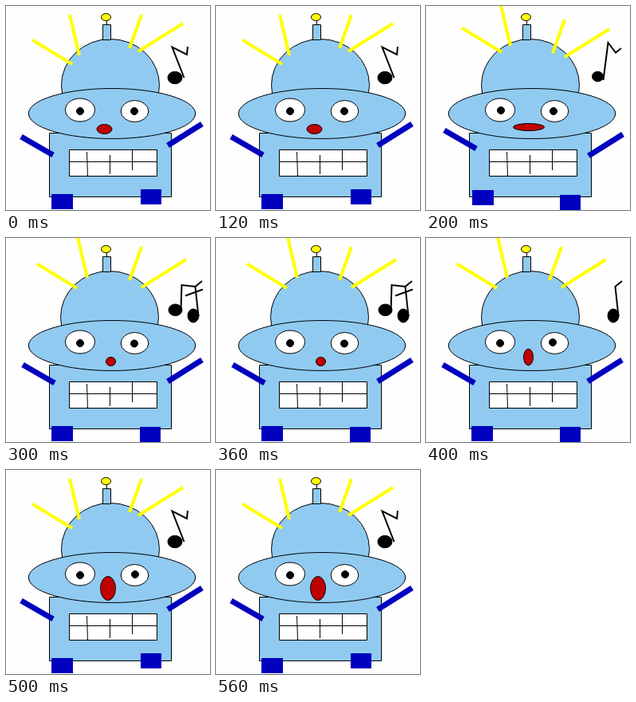
Recreate the animation shown at these times as an HTML page with a canvas. Size 256 by 256 pixels, loop 0.6 s.

```html
<!DOCTYPE html>
<html lang="en">
<head>
<meta charset="utf-8">
<title>Singing robot</title>
<style>
  html, body { margin: 0; width: 100%; height: 100%; overflow: hidden; background: #fefefe; }
  canvas { display: block; width: 256px; height: 256px; }
</style>
</head>
<body>
<canvas id="stage" width="256" height="256"></canvas>
<script>
const ctx = document.getElementById('stage').getContext('2d');
const SKIN = '#90caf1', YELLOW = '#ffff00', BLUE = '#0000bf', RED = '#c00000';

function paint(fill) {
  ctx.fillStyle = fill;
  ctx.fill();
  ctx.strokeStyle = '#000';
  ctx.lineWidth = 1;
  ctx.stroke();
}
function oval(x, y, rx, ry, fill) {
  ctx.beginPath();
  ctx.ellipse(x, y, rx, ry, 0, 0, Math.PI * 2);
  paint(fill);
}
function box(x, y, w, h, fill) {
  ctx.beginPath();
  ctx.rect(x, y, w, h);
  paint(fill);
}
function line(color, width, ...points) {
  ctx.beginPath();
  for (let i = 0; i < points.length; i += 2) ctx.lineTo(points[i], points[i + 1]);
  ctx.strokeStyle = color;
  ctx.lineWidth = width;
  ctx.stroke();
}
function slide([dx, dy], x1, y1, x2, y2, color, width) {
  line(color, width, x1 + dx, y1 + dy, x2 + dx, y2 + dy);
}

// Offsets of the moving parts from their resting places
const still = [0, 0];
const rest = { rays: [still, still, still, still], arms: [still, still], feet: [still, still] };
const high = {
  rays: [[12, -15], [14, -12], [4, 6], [8, 7]],
  arms: [[4, -8], [1, 13]],
  feet: [[1, -5], [-1, 7]]
};
const mid = {
  rays: [[6, -10], [10, -12], still, [4, 5]],
  arms: [[2, -5], [0, 5]],
  feet: [still, [-1, 7]]
};

const ink = (...points) => line('#000', 2, ...points);
function zigzagNote() {
  oval(212, 90, 9, 7.7, '#000');
  ink(223.5, 90, 208.5, 51.5, 227, 61, 228, 51);
}
function hookNote() {
  oval(215.5, 88.5, 7, 6.3, '#000');
  ink(222.5, 93, 228.5, 46, 238, 58.5, 245, 53);
}
function smallNote() {
  oval(235, 97.5, 7, 8.5, '#000');
  ink(241.5, 98, 237.5, 61, 246, 54);
}
function pairedNote() {
  smallNote();
  oval(212.5, 90.3, 8.5, 7.3, '#000');
  ink(219.5, 90, 220.5, 59, 238, 61);
  ink(225, 72.5, 247, 64.5);
}

const poses = [
  { until: 200, limbs: rest, mouth: [123.5, 154.5, 9.5, 6], pupils: [93, 132, 161, 132], note: zigzagNote },
  { until: 300, limbs: high, mouth: [129, 152, 19.5, 4.5], pupils: [94, 131, 160, 132], note: hookNote },
  { until: 400, limbs: mid, mouth: [131.5, 155, 6, 5.5], pupils: [93, 132, 161, 132.5], headX: -1, note: pairedNote },
  { until: 500, limbs: mid, mouth: [128.5, 149.5, 6, 10.3], pupils: [93, 132, 159, 131], note: smallNote },
  { until: 600, limbs: rest, mouth: [128, 148.5, 9.5, 15], pupils: [93, 132, 162, 131], note: zigzagNote }
];

function draw({ limbs: { rays, arms, feet }, mouth, pupils, headX = 0, note }) {
  ctx.fillStyle = '#fefefe';
  ctx.fillRect(0, 0, 256, 256);

  // Body and teeth
  box(54.5, 159.5, 153, 80, SKIN);
  box(79.5, 180.5, 110, 33, '#fff');
  line('#000', 1, 80, 195.5, 189, 195.5);
  line('#000', 1, 101.5, 183, 102.5, 213);
  line('#000', 1, 130.5, 187, 130.5, 211);
  line('#000', 1, 158.5, 181, 158.5, 206);

  // Head
  oval(131 + headX, 99.5, 61.5, 58, SKIN);
  box(121.5, 23.5, 10, 19, SKIN);
  line('#000', 1, 126.5, 18, 126.5, 23);
  oval(125.5, 14, 6, 4.5, YELLOW);
  oval(133, 135, 104.7, 31.5, SKIN);

  // Face
  oval(93, 130.5, 18.5, 14.5, '#fff');
  oval(161.5, 132, 17.3, 13.5, '#fff');
  oval(pupils[0], pupils[1], 4.5, 4.5, '#000');
  oval(pupils[2], pupils[3], 4.5, 4.5, '#000');
  oval(...mouth, RED);

  slide(rays[0], 33, 42.5, 83, 73, YELLOW, 4);
  slide(rays[1], 80, 11, 92, 62, YELLOW, 4);
  slide(rays[2], 170, 11, 155, 53, YELLOW, 4);
  slide(rays[3], 222, 22, 166, 57, YELLOW, 4);

  slide(arms[0], 19, 164, 59, 187, BLUE, 7);
  slide(arms[1], 246, 148, 203, 175, BLUE, 7);
  ctx.fillStyle = BLUE;
  ctx.fillRect(57 + feet[0][0], 236 + feet[0][1], 27, 19);
  ctx.fillRect(169 + feet[1][0], 230 + feet[1][1], 26, 19);

  note();
}

function tick() {
  const t = performance.now() % 600;
  draw(poses.find(pose => t < pose.until));
  requestAnimationFrame(tick);
}
tick();
</script>
</body>
</html>
```
